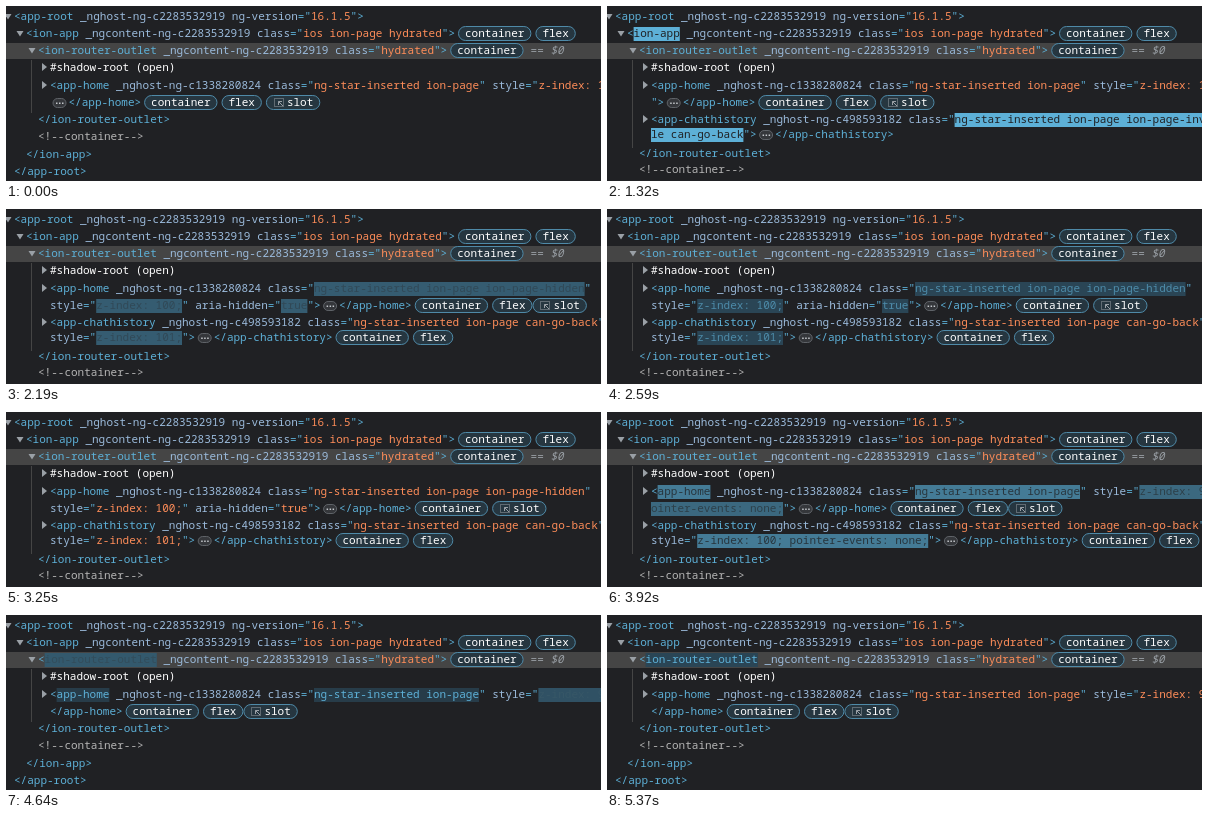
An HTML page with a canvas for the animation above (5440 ms loop, 595x175 px).

```html
<!DOCTYPE html>
<html lang="en">
<head>
<meta charset="utf-8">
<title>Elements panel</title>
<style>
  html, body { margin: 0; width: 100%; height: 100%; overflow: hidden; background: #202124; }
  canvas { display: block; }
</style>
</head>
<body>
<canvas id="stage" width="595" height="175"></canvas>
<script>
const ctx = document.getElementById('stage').getContext('2d');
const LOOP = 5440;
const FONT = '11px "Noto Sans Mono", "DejaVu Sans Mono", monospace';
const TAG = '#5db0d7', NAME = '#9bbbdc', VALUE = '#fe8d59', GREY = '#9aa0a6';
const FLASH = [93, 176, 215], DIM = [42, 69, 85], DARK = [32, 33, 36];

const TICKS = [0, 1320, 1390, 1520, 1650, 1720, 1860, 1990, 2060, 2120, 2190, 2320,
  2460, 2590, 2920, 2990, 3120, 3180, 3250, 3850, 3920, 3980, 4050, 4120, 4250, 4380,
  4440, 4510, 4580, 4640, 4780, 4910, 5040, 5370];

let now = 0, x = 0, rowTop = 0;

const between = (a, b) => now >= a && now < b;
const blend = (a, b, p, alpha = 1) =>
  `rgba(${a.map((v, i) => Math.round(v + (b[i] - v) * p))},${alpha})`;

// Highlight colours of a changed part, or null when it is at rest.
function flash(start, end) {
  if (!between(start, end)) return null;
  const u = (now - start) / (end - start);
  const left = 1 - Math.min(1, u / 0.8);
  return {
    back: blend(FLASH, DIM, 1 - left ** 7, Math.min(1, (1 - u) / 0.2)),
    text: blend(DARK, FLASH, 1 - left ** 1.5),
  };
}

function put(text, color, glow) {
  const width = ctx.measureText(text).width;
  if (glow) {
    ctx.fillStyle = glow.back;
    ctx.fillRect(x, rowTop, width, 14);
  }
  ctx.fillStyle = glow ? glow.text : color;
  ctx.fillText(text, x, rowTop + 10);
  x += width;
}

function tagStart(name, glow) {
  put('<', TAG);
  put(name, TAG, glow);
}

function attr(name, value, glow) {
  put(' ' + name, NAME);
  if (value === undefined) return;
  put('="', TAG);
  put(value, VALUE, glow);
  put('"', TAG);
}

function pill(left, y, width, height, fill, stroke) {
  ctx.beginPath();
  ctx.roundRect(left + 0.5, y + 0.5, width - 1, height - 1, height / 2);
  ctx.fillStyle = fill;
  ctx.fill();
  ctx.strokeStyle = stroke;
  ctx.stroke();
}

function badge(label, gap = 3) {
  const icon = label === 'slot' ? 14 : 0;
  const width = ctx.measureText(label).width + 14 + icon;
  x += gap;
  pill(x, rowTop - 1, width, 15, '#263640', '#4f8aa8');
  if (icon) slotIcon(Math.round(x) + 8, rowTop + 2);
  x += 7 + icon;
  put(label, '#ffffff');
  x += 7;
}

function slotIcon(left, y) {
  ctx.strokeStyle = GREY;
  ctx.setLineDash([1, 1]);
  ctx.strokeRect(left + 0.5, y + 0.5, 9, 8);
  ctx.setLineDash([]);
  ctx.beginPath();
  ctx.moveTo(left + 9, y + 8);
  ctx.lineTo(left + 4.5, y + 3.5);
  ctx.moveTo(left + 4.5, y + 7);
  ctx.lineTo(left + 4.5, y + 3.5);
  ctx.lineTo(left + 8, y + 3.5);
  ctx.stroke();
}

function ellipsis() {
  pill(x + 2.5, rowTop + 2, 14, 10, '#35373b', '#5f6368');
  ctx.fillStyle = '#c4c7cb';
  for (let i = 0; i < 3; i++) ctx.fillRect(x + 6 + i * 3, rowTop + 6.5, 1.5, 1.5);
  x += 18.5;
}

function arrow(isOpen) {
  const cx = x - 6, cy = rowTop + 6;
  ctx.beginPath();
  if (isOpen) {
    ctx.moveTo(cx - 3.5, cy - 2);
    ctx.lineTo(cx + 3.5, cy - 2);
    ctx.lineTo(cx, cy + 3.5);
  } else {
    ctx.moveTo(cx - 2, cy - 4);
    ctx.lineTo(cx + 3, cy);
    ctx.lineTo(cx - 2, cy + 4);
  }
  ctx.fillStyle = GREY;
  ctx.fill();
}

function row(index, depth, expanded) {
  rowTop = Math.round(3.6 + 17.25 * index) - (expanded && index > 6 ? (index === 8 ? 1 : 2) : 0);
  x = 8 + 12 * depth;
}

function ancestors() {
  row(0, 0);
  arrow(true);
  tagStart('app-root');
  attr('_nghost-ng-c2283532919');
  attr('ng-version', '16.1.5');
  put('>', TAG);

  row(1, 1);
  arrow(true);
  tagStart('ion-app', flash(1320, 2190));
  attr('_ngcontent-ng-c2283532919');
  attr('class', 'ios ion-page hydrated');
  put('>', TAG);
  badge('container');
  badge('flex', 4);

  row(2, 2);
  ctx.fillStyle = '#454545';
  ctx.fillRect(0, rowTop - 1, 595, 16);
  arrow(true);
  tagStart('ion-router-outlet', flash(4440, 5600));
  attr('_ngcontent-ng-c2283532919');
  attr('class', 'hydrated');
  put('>', TAG);
  badge('container');
  x += 7;
  put('== ', GREY);
  ctx.font = 'italic ' + FONT;
  put('$0', GREY);
  ctx.font = FONT;

  row(3, 3);
  arrow(false);
  put('#shadow-root (open)', '#ffffff');
}

function homePage() {
  const hidden = between(1990, 3850);
  const leaving = between(1520, 1990), returning = between(3850, 4440);
  const styleGlow = flash(1520, 1990) || flash(1990, 3250) || flash(3850, 4440) || flash(4440, 5370);
  const hideGlow = flash(1990, 3250);

  row(4, 3);
  arrow(false);
  tagStart('app-home', flash(3850, 4780));
  attr('_nghost-ng-c1338280824');
  attr('class', 'ng-star-inserted ion-page' + (hidden ? ' ion-page-hidden' : ''),
    hideGlow || flash(3850, 4780));
  if (!hidden) attr('style', now < 3850 ? 'z-index: 100;' : 'z-index: 99; p', styleGlow);

  row(5, 3);
  if (hidden) {
    put('style', NAME);
    put('="', TAG);
    put('z-index: 100;', VALUE, hideGlow);
    put('"', TAG);
    attr('aria-hidden', 'true', hideGlow);
    put('>', TAG);
  } else if (leaving || returning) {
    put(leaving ? 'pointer-events: none;' : 'ointer-events: none;', VALUE, styleGlow);
    put('">', TAG);
  } else if (between(1320, 1520)) {
    put('">', TAG);
  }
  if (now < 4440) ellipsis();
  put('</app-home>', TAG);
  badge('container');
  const flexShown = !between(2320, 3850);
  if (flexShown) badge('flex', 4);
  badge('slot', flexShown && now >= 1520 ? 0 : 4);
}

function historyPage() {
  const entering = now < 1520;
  const moving = between(1520, 1990) || now >= 3850;
  const classGlow = flash(1320, 1520) || flash(1520, 1990);

  row(6, 3);
  arrow(false);
  tagStart('app-chathistory');
  attr('_nghost-ng-c498593182');
  attr('class', 'ng-star-inserted ion-page ' + (entering ? 'ion-page-invisib' : 'can-go-back'), classGlow);

  row(7, 3, true);
  if (entering) {
    put('le can-go-back', VALUE, classGlow);
  } else {
    put('style', NAME);
    put('="', TAG);
    put(`z-index: ${now < 3850 ? 101 : 100};` + (moving ? ' pointer-events: none;' : ''), VALUE,
      flash(1520, 1990) || flash(1990, 3250) || flash(3850, 4780));
  }
  put('">', TAG);
  ellipsis();
  put('</app-chathistory>', TAG);
  if (!entering) {
    badge('container');
    badge('flex', 4);
  }
}

function closingTags(first, expanded) {
  const lines = [
    [2, '</ion-router-outlet>', TAG],
    [2, '<!--container-->', '#b4b4b4'],
    [1, '</ion-app>', TAG],
    [0, '</app-root>', TAG],
  ];
  lines.forEach(([depth, text, color], i) => {
    row(first + i, depth, expanded);
    put(text, color);
  });
}

// Thin line joining the selected element to its closing tag.
function guide(closingRow) {
  row(closingRow, 2);
  ctx.fillStyle = '#454545';
  ctx.fillRect(25, 54, 1, rowTop - 54);
}

function draw(time) {
  const clock = time % LOOP;
  now = TICKS.findLast(tick => tick <= clock);
  ctx.font = FONT;
  ctx.lineWidth = 1;
  ctx.fillStyle = '#202124';
  ctx.fillRect(0, 0, 595, 175);
  const expanded = between(1320, 4440);
  const closingRow = expanded ? 8 : 6;
  guide(closingRow);
  ancestors();
  homePage();
  if (expanded) historyPage();
  closingTags(closingRow, expanded);
}

const begin = performance.now();
function frame() {
  draw(performance.now() - begin);
  requestAnimationFrame(frame);
}
frame();
</script>
</body>
</html>
```
